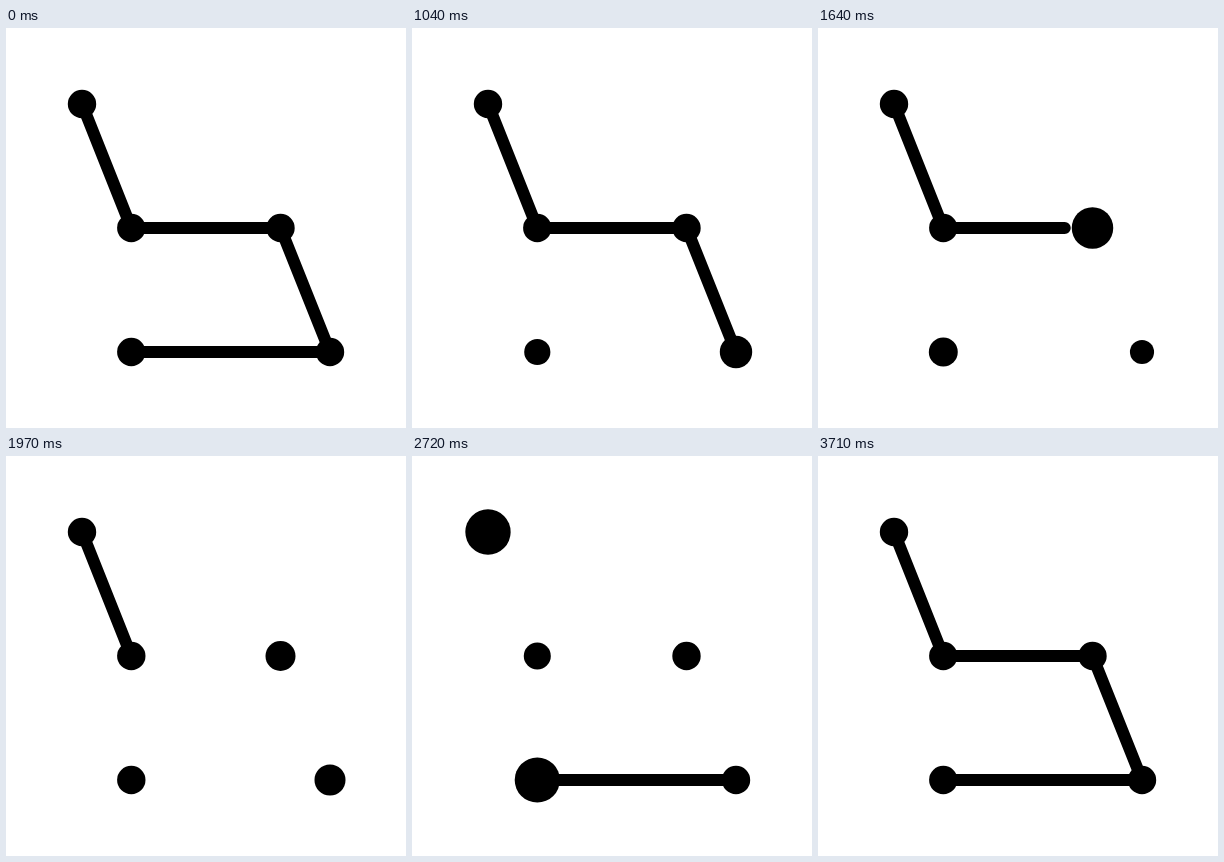
Recreate the animation shown at these times as an HTML page. Size 400 by 400 pixels, loop 3.74 s.

```html
<!DOCTYPE html>
<html lang="en">
<head>
<meta charset="utf-8">
<title>Linked dots</title>
<style>
  html, body { margin: 0; width: 100%; height: 100%; overflow: hidden; background: #fff; }
  svg { display: block; width: 100%; height: 100%; }
  path { fill: none; stroke: #000; stroke-width: 12; stroke-linecap: round; stroke-linejoin: round; }
</style>
</head>
<body>
<svg viewBox="0 0 400 400"><path id="line"/></svg>
<script>
const LOOP = 3740;
const RADIUS = 14.2;
const STEP = 420;                      // time to erase one segment
const DRAW = { start: 2460, speed: 0.77 };

// Dots in path order, with the times at which each one pops.
const dots = [
  { x: 125.3, y: 324, pops: [512, 2430] },
  { x: 324, y: 324, pops: [1000] },
  { x: 274.5, y: 200, pops: [1490] },
  { x: 125.3, y: 200, pops: [1985] },
  { x: 76, y: 76, pops: [2440] }
];

// Radius offsets of one pop: [time, offset]
const bounce = [[0, 0], [270, 8.5], [600, -2.3], [900, 1.5], [1220, 0]];

const svg = document.querySelector('svg');
const line = document.getElementById('line');
line.setAttribute('d', 'M' + dots.map(d => `${d.x} ${d.y}`).join('L'));

for (const d of dots) {
  d.el = document.createElementNS(svg.namespaceURI, 'circle');
  d.el.setAttribute('cx', d.x);
  d.el.setAttribute('cy', d.y);
  svg.append(d.el);
}

const lengths = dots.slice(1).map((d, i) => Math.hypot(d.x - dots[i].x, d.y - dots[i].y));
const total = lengths.reduce((a, b) => a + b);

const clamp = (v, lo, hi) => Math.min(hi, Math.max(lo, v));
const sineOut = u => Math.sin(u * Math.PI / 2);
const sineInOut = u => (1 - Math.cos(u * Math.PI)) / 2;
const cubicInOut = u => u < 0.5 ? 4 * u ** 3 : 1 - 4 * (1 - u) ** 3;

function pop(t) {
  const i = bounce.findIndex(([end]) => t < end);
  if (i < 1) return 0;
  const [t0, a] = bounce[i - 1], [t1, b] = bounce[i];
  const ease = i === 1 ? sineOut : sineInOut;
  return a + (b - a) * ease((t - t0) / (t1 - t0));
}

function trim(t) {
  if (t >= DRAW.start) return [0, Math.min(total, (t - DRAW.start) * DRAW.speed)];
  const from = lengths.reduce((sum, len, i) =>
    sum + len * cubicInOut(clamp((t - dots[i].pops[0]) / STEP, 0, 1)), 0);
  return [from, total];
}

function render(t) {
  const [from, to] = trim(t);
  line.setAttribute('stroke-dasharray', `0 ${from} ${to - from} ${total * 2}`);
  for (const d of dots) {
    d.el.setAttribute('r', d.pops.reduce((r, start) => r + pop(t - start), RADIUS));
  }
}

const begin = performance.now();
function frame() {
  render((performance.now() - begin) % LOOP);
  requestAnimationFrame(frame);
}
frame();
</script>
</body>
</html>
```
